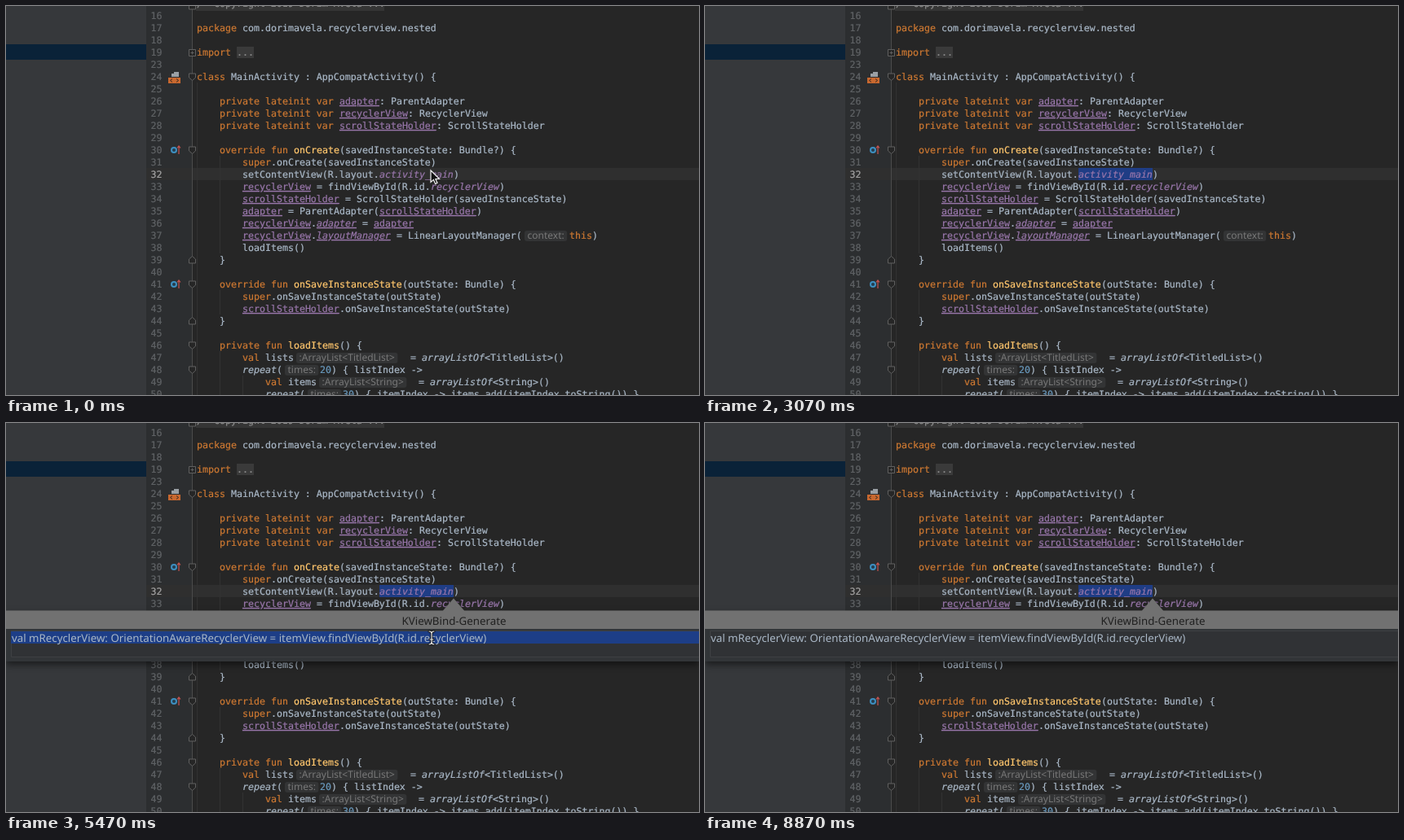
An HTML page for the animation above (8.94 s loop, 850 by 478 pixels).

```html
<!DOCTYPE html>
<html lang="en">
<head>
<meta charset="utf-8">
<title>Generate view binding</title>
<style>
html, body { margin: 0; width: 100%; height: 100%; overflow: hidden; background: #262626; }
svg { display: block; width: 100%; height: 100%; }
text { white-space: pre; fill: currentColor; text-rendering: geometricPrecision; }
.code text { font: 11.628px "DejaVu Sans Mono", monospace; color: #a9b7c6; stroke: currentColor; stroke-width: .22; }
.code .k { color: #cc7832; }
.code .f { color: #ffc66d; }
.code .n { color: #6897bb; }
.code .p, .code .u, .code .i { color: #9876aa; }
.code .p, .code .u { text-decoration: underline; }
.code .i, .code .u, .code .t { font-style: italic; }
.code .c { color: #8c8c8c; }
.code .no { color: #606366; }
.code .now { color: #a4a3a3; }
.code .h { font: 12px "Noto Sans", sans-serif; color: #787878; stroke: none; }
.ui { font: 13.3px "Noto Sans", "DejaVu Sans", sans-serif; color: #b9bbbd; }
.mid { text-anchor: middle; }
.end { text-anchor: end; }

.play { animation: 8940ms step-end infinite; }
#picked { animation-name: picked; }
#bulb { animation-name: bulb; }
#caret { animation-name: caret; }
#popup { animation-name: popup; }
#menu { animation-name: menu; }
#choice { animation-name: choice; }
#balloon { animation-name: balloon; animation-timing-function: linear; }
#row { animation-name: row; }
#beam { animation-name: beam, beamPath; }
#arrow { animation-name: arrow, arrowPath; }
#beam, #arrow { animation-timing-function: step-end, ease-in-out; }

@keyframes picked { 0% { opacity: 0 } 5.4%, 100% { opacity: 1 } }
@keyframes bulb { 0% { opacity: 0 } 11.2% { opacity: 1 } 16.4%, 100% { opacity: 0 } }
@keyframes caret {
  0% { opacity: 0 } 5.4% { opacity: 1 } 10.4% { opacity: 0 } 35.8% { opacity: 1 }
  41.4% { opacity: 0 } 47% { opacity: 1 } 52.6%, 100% { opacity: 0 }
}
@keyframes popup { 0% { opacity: 0 } 15% { opacity: 1 } 33.6%, 100% { opacity: 0 } }
@keyframes menu { 0% { opacity: 0 } 16.4%, 100% { opacity: 1 } }
@keyframes choice {
  0% { transform: none } 25.7% { transform: translateY(19px) }
  28.3% { transform: translateY(38px) } 31.2%, 100% { transform: translateY(57px) }
}
@keyframes balloon { 0%, 35% { opacity: 0 } 37.25%, 100% { opacity: 1 } }
@keyframes row { 0% { opacity: 0 } 57.4% { opacity: 1 } 78.6%, 100% { opacity: 0 } }
@keyframes beam { 0% { opacity: 0 } 42.5% { opacity: 1 } 63.4%, 100% { opacity: 0 } }
@keyframes beamPath {
  0%, 43% { transform: translate(521px, 212px) } 49%, 52.5% { transform: translate(497px, 233px) }
  56%, 100% { transform: translate(522px, 264px) }
}
@keyframes arrow { 0% { opacity: 1 } 11.2% { opacity: 0 } 63.4% { opacity: 1 } 91.7%, 100% { opacity: 0 } }
@keyframes arrowPath {
  0%, 11.2% { transform: translate(521px, 202px) } 11.3%, 63.4% { transform: translate(522px, 264px) }
  69.5%, 83.9% { transform: translate(623px, 264px) } 90%, 100% { transform: translate(726px, 300px) }
}
</style>
</head>
<body>
<svg viewBox="0 0 850 478" preserveAspectRatio="none">
  <defs>
    <filter id="shadow" x="-10%" y="-20%" width="120%" height="150%">
      <feDropShadow dx="0" dy="4" stdDeviation="4" flood-color="#000" flood-opacity=".5"/>
    </filter>
  </defs>

  <rect width="850" height="478" fill="#262626"/>
  <rect width="172" height="478" fill="#36383b"/>
  <rect y="47" width="172" height="19" fill="#0a2238"/>
  <rect x="172" width="56" height="478" fill="#2c2e30"/>
  <rect x="172" y="199" width="678" height="15" fill="#2f2f2f"/>
  <g id="guides" stroke="#323232"></g>
  <path d="M228.5 0V478" stroke="#4b4b4b"/>
  <rect x="233" y="-12" width="231" height="18" fill="#353535"/>
  <rect x="283" y="50" width="21" height="14" fill="#3a3a3a"/>
  <rect id="picked" class="play" x="458" y="199" width="91" height="15" fill="#1f3d85"/>
  <g id="code" class="code"></g>
  <g id="folds" fill="#262626" stroke="#606060"></g>

  <path d="M203 87V83h3v-2h6v6z" fill="#9aa0a5"/>
  <rect x="199" y="88" width="15" height="7" fill="#c8682f"/>
  <path d="M204 89.5l-2.5 2 2.5 2M209 89.5l2.5 2-2.5 2" fill="none" stroke="#3a2a20"/>
  <g id="overrides"></g>

  <g id="bulb" class="play">
    <path d="M245.5 207c0-2-2.500-2.500-2.500-5a5.200 5.200 0 0 1 10.400 0c0 2.500-2.500 3-2.500 5z" fill="#f0a732"/>
    <path d="M245.500 208.500h5.500M246 210.500h4.500" stroke="#a9adb0" stroke-width="1.300"/>
  </g>
  <path id="caret" class="play" d="M549 199v15" stroke="#d0d0d0" stroke-width="1.600"/>

  <g id="popup" class="play">
    <rect x="549" y="214" width="265" height="200" fill="#36383b" stroke="#46494b" stroke-width=".6" filter="url(#shadow)"/>
    <g id="menu" class="play">
      <rect x="549" y="214" width="265" height="22" fill="#46494c"/>
      <text class="ui mid" x="683.500" y="230">Generate</text>
      <rect id="choice" class="play" x="549" y="239" width="265" height="19" fill="#2457c5"/>
      <path d="M549 316.500h265" stroke="#4c4f51"/>
    </g>
  </g>

  <g id="balloon" class="play">
    <g filter="url(#shadow)">
      <path d="M0 230.500H536L549 215.500L562 230.500H850V253H0z" fill="#717171"/>
      <rect y="253" width="850" height="40" fill="#333538"/>
    </g>
    <path d="M850 255.500H6.500V287.500H850" fill="#303235" stroke="#3e4043"/>
    <rect id="row" class="play" x="6" y="256" width="844" height="15" fill="#1d3e87"/>
    <text class="ui mid" x="549.500" y="248" style="color:#202020">KViewBind-Generate</text>
    <text class="ui" x="7" y="268.500" style="color:#a9b7c6">val mRecyclerView: OrientationAwareRecyclerView = itemView.findViewById(R.id.recyclerView)</text>
  </g>

  <g id="beam" class="play" fill="none" stroke-linecap="round">
    <path d="M-3-8q3 0 3 3V5q0 3-3 3M3-8q-3 0-3 3V5q0 3 3 3M-2 2h4" stroke="#111" stroke-width="3"/>
    <path d="M-3-8q3 0 3 3V5q0 3-3 3M3-8q-3 0-3 3V5q0 3 3 3M-2 2h4" stroke="#eee" stroke-width="1.200"/>
  </g>
  <path id="arrow" class="play" d="M0 0V14.500L3.400 11.400L5.600 16.500L8 15.400L5.900 10.500H10.500z" fill="#111" stroke="#f2f2f2" stroke-width="1.200"/>
</svg>

<script>
const CHAR = 7;
const $ = id => document.getElementById(id);

function add(parent, tag, attrs, content = "") {
  const node = document.createElementNS("http://www.w3.org/2000/svg", tag);
  for (const key in attrs) node.setAttribute(key, attrs[key]);
  node.textContent = content;
  parent.append(node);
  return node;
}

// "~x" starts a span of style x; a hint ends with the x position where code resumes.
const lines = [
  ["", 0, "~c/* Copyright 2019 Dorim Avela ..."],
  [16, 0, ""],
  [17, 0, "~kpackage ~dcom.dorimavela.recyclerview.nested"],
  [18, 0, ""],
  [19, 0, "~kimport ~c..."],
  [23, 0, ""],
  [24, 0, "~kclass ~dMainActivity : AppCompatActivity() {"],
  [25, 0, ""],
  [26, 1, "~kprivate lateinit var ~padapter~d: ParentAdapter"],
  [27, 1, "~kprivate lateinit var ~precyclerView~d: RecyclerView"],
  [28, 1, "~kprivate lateinit var ~pscrollStateHolder~d: ScrollStateHolder"],
  [29, 0, ""],
  [30, 1, "~koverride fun ~fonCreate~d(savedInstanceState: Bundle?) {"],
  [31, 2, "~ksuper~d.onCreate(savedInstanceState)"],
  [32, 2, "~dsetContentView(R.layout.~iactivity_main~d)"],
  [33, 2, "~precyclerView~d = findViewById(R.id.~irecyclerView~d)"],
  [34, 2, "~pscrollStateHolder~d = ScrollStateHolder(savedInstanceState)"],
  [35, 2, "~padapter~d = ParentAdapter(~pscrollStateHolder~d)"],
  [36, 2, "~precyclerView~d.~uadapter~d = ~padapter"],
  [37, 2, "~precyclerView~d.~ulayoutManager~d = LinearLayoutManager(~hcontext:|691~kthis~d)"],
  [38, 2, "~dloadItems()"],
  [39, 1, "~d}"],
  [40, 0, ""],
  [41, 1, "~koverride fun ~fonSaveInstanceState~d(outState: Bundle) {"],
  [42, 2, "~ksuper~d.onSaveInstanceState(outState)"],
  [43, 2, "~pscrollStateHolder~d.onSaveInstanceState(outState)"],
  [44, 1, "~d}"],
  [45, 0, ""],
  [46, 1, "~kprivate fun ~floadItems~d() {"],
  [47, 2, "~kval ~dlists~h:ArrayList<TitledList>|496~d= ~tarrayListOf~d<TitledList>()"],
  [48, 2, "~trepeat~d(~htimes:|385~n20~d) { listIndex ->"],
  [49, 3, "~kval ~ditems~h:ArrayList<String>|506~d= ~tarrayListOf~d<String>()"],
  [50, 3, "~trepeat~d(~htimes:|413~n30~d) { itemIndex -> items.add(itemIndex.toString()) }"],
];

function drawHint(x, y, label) {
  const box = add($("code"), "rect", { x: x + 3, y: y - 10, height: 13, rx: 3, fill: "#333435" });
  const text = add($("code"), "text", { x: x + 6.5, y: y - .3, class: "h" }, label);
  box.setAttribute("width", text.getComputedTextLength() + 7);
}

lines.forEach(([number, indent, source], i) => {
  const y = 1 + i * 15;
  let x = 234 + indent * 4 * CHAR;
  add($("code"), "text", { x: 177.5, y, class: number === 32 ? "now" : "no" }, number);
  for (const span of source.split("~").slice(1)) {
    const style = span[0], [label, resume] = span.slice(1).split("|");
    if (style === "h") {
      drawHint(x, y, label);
      x = +resume;
    } else {
      add($("code"), "text", { x, y, class: style }, label);
      x += label.length * CHAR;
    }
  }
});

const guides = [[234.5, 94, 478], [262.5, 184, 304], [262.5, 349, 379], [262.5, 424, 478], [290.5, 454, 478]];
for (const [x, top, bottom] of guides) add($("guides"), "path", { d: `M${x} ${top}V${bottom}` });

const fold = (y, up) => add($("folds"), "path", {
  d: "M-4-4H4V1L0 4.500L-4 1z", transform: `translate(228.5 ${y}) scale(1 ${up ? -1 : 1})`
});
[87, 177, 342, 417, 447].forEach(y => fold(y));
[0, 312, 387].forEach(y => fold(y, true));
add($("folds"), "path", { d: "M224.500 53.500h8v8h-8zM226.500 57.500h4M228.500 55.500v4" });

for (const y of [177, 342]) {
  add($("overrides"), "circle", { cx: 206, cy: y, r: 3, fill: "#263b4a", stroke: "#3d8fc0", "stroke-width": 2 });
  add($("overrides"), "path", { d: `M212 ${y + 5}v-10m-2 2.500l2-2.500 2 2.500`, fill: "none", stroke: "#c75450", "stroke-width": 1.2 });
}

const actions = [
  ["Secondary Constructor"], ["equals() and hashCode()"], ["toString()"], ["KotlinFIndVIewById"],
  ["Override Methods...", "^O"], ["Implement Methods...", "^I"], ["Test..."], ["Copyright"],
  ["Kotlin data classes from JSON", "⌥K"],
];
actions.forEach(([label, keys], i) => {
  const y = 253 + i * 19 + (i > 3 ? 3 : 0);
  add($("menu"), "text", { x: 576, y, class: "ui" }, label);
  if (keys) add($("menu"), "text", { x: 804, y, class: "ui end" }, keys);
});
</script>
</body>
</html>
```
